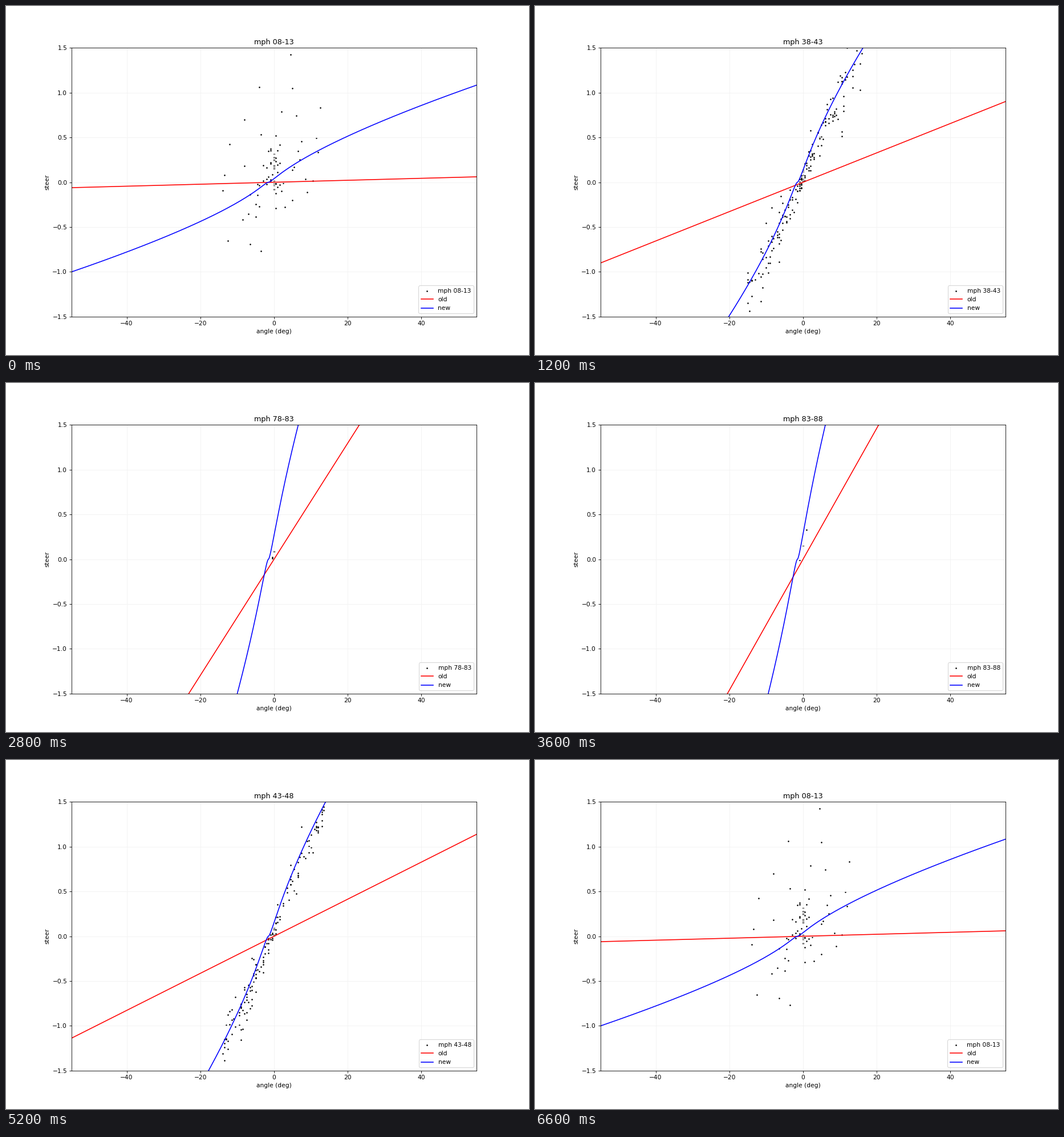
A matplotlib script for the animation above (6.8 s loop, 917 by 611 pixels).

```python
import numpy as np
import matplotlib.pyplot as plt
from matplotlib.animation import FuncAnimation

DPI = 76.4
BINS = 17          # speed bins, 5 mph wide, starting at 8 mph
ANGLES = np.linspace(-55, 55, 1101)


def mid_speed(k):
    return 10.5 + 5 * k


def old_steer(angle, mph):
    return 1e-5 * mph ** 2 * angle


def new_steer(angle, mph):
    """Sigmoid times power law around a small angle offset."""
    shifted = angle + 1.53
    size = np.abs(shifted)
    gain = (.0094 + .00468 * mph) * np.where(shifted < 0, .963, 1)
    return gain * np.sign(shifted) * size ** 1.73 / (1.5 + size)


def cloud(k):
    """Samples of one speed bin: they thin out and tighten with speed."""
    rng = np.random.default_rng(40 + k)
    count = int(np.interp(k, [0, 3, 6, 7, 10, 11, 14, 16],
                          [80, 170, 175, 150, 68, 33, 4, 2]))
    width = np.interp(k, [0, 2, 6, 10, 14], [14, 20, 16, 8, 1.2])
    noise = np.interp(k, [0, 4, 6, 10], [.24, .13, .09, .05])
    peak = np.interp(k, [0, 3], [2.2, 1.3])   # crowding around zero

    reach = rng.uniform(0, 1, count) ** peak
    angle = width * reach * rng.choice([-1, 1], count)
    angle = np.round(angle * 2) / 2
    spread = noise * np.clip(.5 + np.abs(angle) / 8, .5, 1.6)
    steer = new_steer(angle - .8, mid_speed(k))
    steer += spread * rng.standard_t(5, count)
    if k == 0:
        steer += .1
    return np.column_stack([angle, steer])


clouds = [cloud(k) for k in range(BINS)]

fig, ax = plt.subplots(figsize=(917 / DPI, 611 / DPI), dpi=DPI)
dots = ax.scatter([], [], s=2, color="black", label="mph 08-13")
old_line, = ax.plot(ANGLES, 0 * ANGLES, color="red", label="old")
new_line, = ax.plot(ANGLES, 0 * ANGLES, color="blue", label="new")
ax.set(xlim=(-55, 55), ylim=(-1.5, 1.5), xlabel="angle (deg)", ylabel="steer")
ax.grid(color="0.95")
title = ax.set_title("mph 08-13")
legend_label = ax.legend(loc="lower right").get_texts()[0]


def update(i):
    k = min(i, 2 * BINS - 1 - i)   # up through the bins and back
    low = 8 + 5 * k
    name = f"mph {low:02d}-{low + 5:02d}"
    title.set_text(name)
    legend_label.set_text(name)
    dots.set_offsets(clouds[k])
    old_line.set_ydata(old_steer(ANGLES, mid_speed(k)))
    new_line.set_ydata(new_steer(ANGLES, mid_speed(k)))
    return dots, old_line, new_line, title, legend_label


anim = FuncAnimation(fig, update, frames=2 * BINS, interval=200,
                     repeat=True, repeat_delay=0)
plt.show()
```
